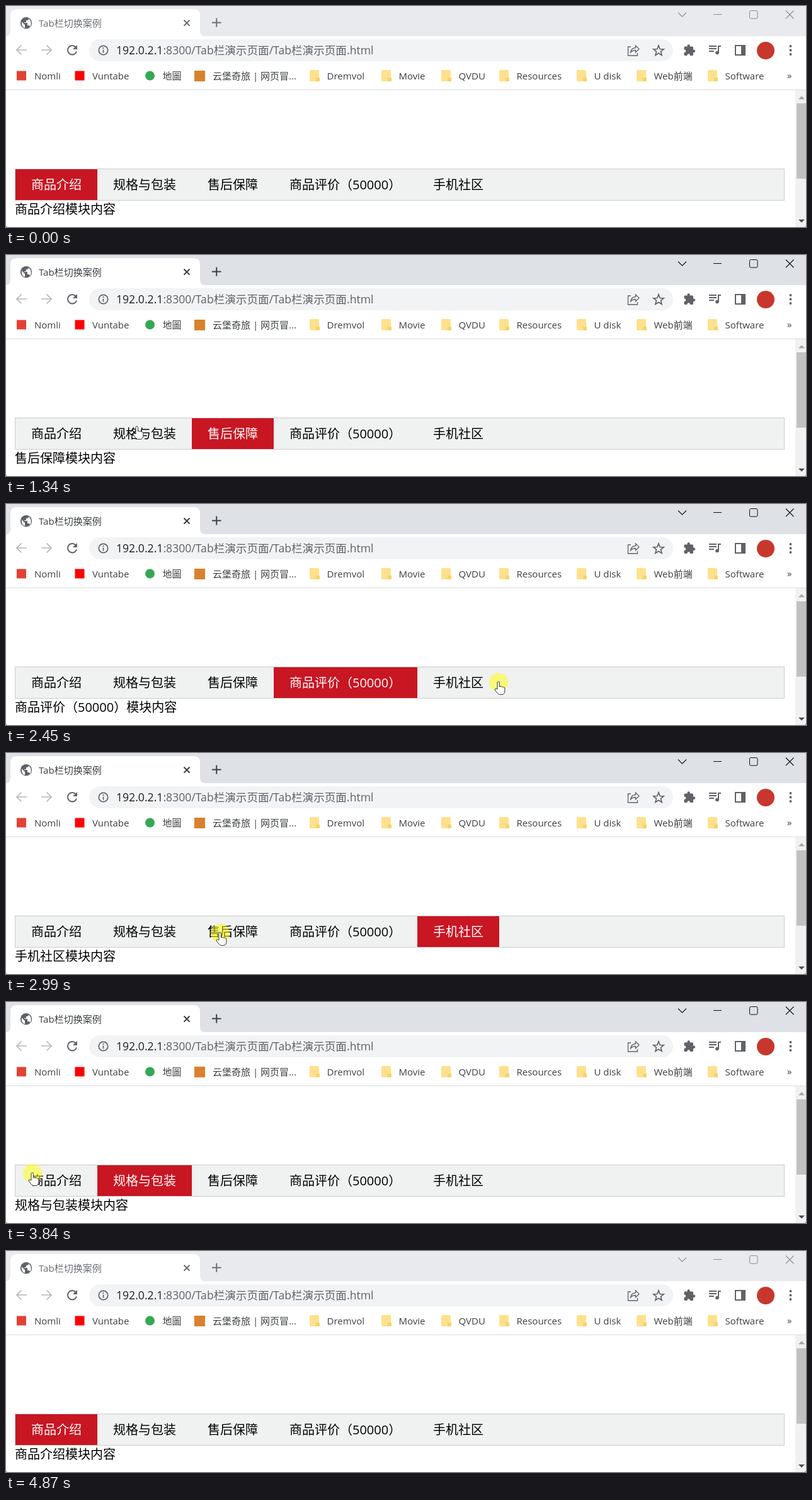
An HTML page for the animation above (4930 ms loop, 1270x352 px).

```html
<!DOCTYPE html>
<html lang="zh-CN">
<head>
<meta charset="utf-8">
<title>Tab栏切换案例</title>
<style>
html, body { margin: 0; width: 100%; height: 100%; overflow: hidden; background: #fff; }
svg { display: block; width: 1270px; height: 352px; }
text { font: 15px "Open Sans", "Noto Sans CJK SC", "Noto Sans CJK", sans-serif; fill: #3c4043; white-space: pre; }
.page text { font-size: 20px; fill: #000; }
.page .on { fill: #fff; }
.url { font-size: 17.6px; fill: #5f6368; }
.line { fill: none; stroke: #5f6368; stroke-width: 1.7; }
</style>
</head>
<body>
<svg id="stage" viewBox="0 0 1270 352"></svg>
<script>
const LOOP = 4930, TICK = 10, HOLD = 100;
const GREY = '#5f6368';
const stage = document.getElementById('stage');

// Tabs stand side by side, each as wide as its label plus 25px padding
let right = 15;
const tabs = ['商品介绍', '规格与包装', '售后保障', '商品评价（50000）', '手机社区'].map(name => {
  const digits = name.replace(/\D/g, '').length;
  const x = right, w = 50 + digits * 11.6 + (name.length - digits) * 20;
  right += w;
  return { name, x, w };
});

// Pointer trips: departure, arrival, press, then the points that shape the way
const trips = [
  [160, 670, 740, [1262, 345], [1230, 0], [730, 70], [355, 281]],
  [1170, 1340, 1470, [355, 281], [208, 273]],
  [1730, 2050, 2080, [208, 273], [530, 267]],
  [2250, 2450, 2450, [530, 267], [782, 283]],
  [2550, 2990, 2990, [782, 283], [340, 286]],
  [3110, 3350, 3380, [340, 286], [215, 261]],
  [3710, 3840, 3840, [215, 261], [42, 272]],
  [3940, 4540, LOOP, [42, 272], [600, 285], [1050, 265], [1285, 356]]
].map(([from, to, press, ...way]) => ({ from, to, press, way, end: way[way.length - 1] }));

const last = (list, test) => list.filter(test).pop();
const mix = (a, b, s) => a.map((v, i) => v + (b[i] - v) * s);
const bezier = (p, s) =>
  p.length === 1 ? p[0] : bezier(p.slice(1).map((b, i) => mix(p[i], b, s)), s);

function pointer(t) {
  const trip = last(trips, m => t >= m.from);
  if (!trip) return [1290, 360];
  const u = Math.min(1, (t - trip.from) / (trip.to - trip.from));
  return bezier(trip.way, trip.way.length > 2 ? u ** 0.6 : u);
}
const isPressed = t => trips.some(m => t >= m.press && t < m.press + HOLD);
const isFocused = t => t >= trips[0].press && t < LOOP - 60;
const isOverTab = t => {
  const [x, y] = pointer(t);
  return x > 15 && x < right && y > 260 && y < 309;
};
function selected(t) {
  const trip = last(trips, m => t >= m.press + HOLD);
  return trip ? tabs.findIndex(tab => trip.end[0] < tab.x + tab.w) : 0;
}

const rect = (x, y, w, h, fill, r = 0) =>
  `<rect x="${x}" y="${y}" width="${w}" height="${h}" rx="${r}" fill="${fill}"/>`;
const circle = (x, y, r, fill) => `<circle cx="${x}" cy="${y}" r="${r}" fill="${fill}"/>`;
const fill = (d, color) => `<path d="${d}" fill="${color}"/>`;
const line = (d, style = '') => `<path class="line" d="${d}" style="${style}"/>`;
const label = (s, x, y, attr = '') => `<text x="${x}" y="${y}" ${attr}>${s}</text>`;

const strip = (id, bg, ink, win) => `<g id="${id}">
  ${rect(0, 0, 1270, 48, bg)}
  ${fill('M0 48Q7 48 7 39V15Q7 5 17 5H298Q308 5 308 15V39Q308 48 316 48Z', '#fff')}
  ${circle(32, 27, 9.2, GREY)}
  ${fill('M25 25l5 5v5q-6-2-5-10zM29 27h5v4h3l1 2q3-4 1-9l-3-4q0 3-4 3v3h-3z', '#fff')}
  ${label('Tab栏切换案例', 52, 33, `style="fill:${ink}"`)}
  ${line('M282.5 22.5l9 9m0-9l-9 9M327 26.5h14.500m-7.250-7v14', `stroke:${ink};stroke-width:2`)}
  ${line('M1067 10.5l6.5 6.5 6.5-6.500M1123 13.500h13M1238 7.500l12.500 12.500m0-12.500l-12.500 12.500', `stroke:${win};stroke-width:1.1`)}
  <rect x="1180.5" y="7.5" width="12.500" height="12.500" rx="2" fill="none" stroke="${win}"/>
</g>`;

const star = Array.from({ length: 10 }, (_, i) => {
  const a = i * Math.PI / 5, r = i % 2 ? 3.7 : 8.6;
  return `${1036 + r * Math.sin(a)},${71.5 - r * Math.cos(a)}`;
}).join(' ');

const puzzle = rect(1076.5, 64.5, 14.5, 14.5, GREY, 1.5) +
  circle(1083.7, 63.5, 2.2, GREY) + circle(1092, 71.7, 2.2, GREY) +
  circle(1077, 71.7, 2.3, '#fff') + circle(1083.7, 78.500, 2.3, '#fff');

const playlist = line('M1116 64h12m-12 4h12m-12 4h8M1131 75V64h4', 'stroke-width:2') +
  circle(1129, 74.5, 2.8, GREY);

const toolbar = `
  ${line('M33 70H17m7.5-7.5L17 70l7.5 7.5', 'stroke:#b5b7ba')}
  ${line('M56 70h16m-7.5-7.5L72 70l-7.5 7.5', 'stroke:#b5b7ba')}
  ${line('M110.5 65.500a7.2 7.2 0 1 0 1.5 7', 'stroke-width:2')}${fill('M113 62v7h-7z', GREY)}
  ${rect(132, 53, 927, 35, '#f1f3f4', 17.5)}
  <circle class="line" cx="154.5" cy="70.5" r="7.2"/>
  ${line('M154.5 66v2m0 1.5v5')}
  ${label('<tspan fill="#202124">192.0.2.1</tspan>:8300/Tab栏演示页面/Tab栏演示页面.html', 175, 77, 'class="url"')}
  ${line('M992 65h-4.5v14h15v-4M991.5 74q1-7 8-7.500v-3.500l5.500 5.500-5.500 5.500v-3.500q-5 0-8 3.500z', 'stroke-width:1.3')}
  <polygon class="line" points="${star}"/>
  ${puzzle}${playlist}
  ${line('M1158 63h15v15h-15z', 'stroke-width:2')}${rect(1167, 62, 7, 17, GREY)}
  ${circle(1206, 71, 14, '#c8372d')}
  ${[-1, 0, 1].map(i => circle(1245.5, 70.5 + 6.5 * i, 1.9, GREY)).join('')}`;

const bookmark = (icon, name, x) => icon + label(name, x, 116.5);
const folder = (name, x) => bookmark(
  rect(x - 28, 102, 15, 18, '#ffe08c', 1.5) + rect(x - 18, 114, 6, 6, '#f7d268', 1), name, x - 0.5);

const bookmarks =
  bookmark(rect(17, 103.5, 15, 15, '#e34133'), 'Nomli', 45) +
  bookmark(rect(109.5, 103.5, 15, 15, '#f00'), 'Vuntabe', 137) +
  bookmark(circle(228.5, 111, 7.5, '#34a853'), '地圖', 248.5) +
  bookmark(rect(299, 103, 17, 17, '#d9822b'), '云堡奇旅 | 网页冒...', 328) +
  folder('Dremvol', 510) + folder('Movie', 624) + folder('QVDU', 719) + folder('Resources', 811) +
  folder('U disk', 934) + folder('Web前端', 1029) + folder('Software', 1142) +
  label('»', 1240, 116) + rect(0, 133, 1270, 1, '#d9dbdf');

const page = `<g class="page">
  <rect x="14.5" y="259.5" width="1221" height="50" fill="#f0f1f1" stroke="#ccc"/>
  ${tabs.map(({ name, x }) => label(name, x + 25, 292)).join('')}
  ${tabs.map(({ name, x, w }, i) => `<g id="tab${i}">
    ${rect(x, 260, w, 49, '#c81623')}
    ${label(name, x + 25, 292, 'class="on"')}${label(name + '模块内容', 14, 331)}
  </g>`).join('')}
</g>`;

const scrollbar = rect(1253, 134, 17, 218, '#f1f1f1') + rect(1255, 155, 15, 120, '#c1c1c1') +
  fill('M1258 148.5l5-5 5 5z', '#a3a3a3') + fill('M1258 340l5 5 5-5z', '#505050');

const corners = fill('M0 349q0 3 3 3H0zM1270 349q0 3-3 3h3z', '#888');

const cursor = `<g id="cursor" stroke="#333" fill="#fff" stroke-linejoin="round">
  <circle id="halo" r="15" cy="1" fill="#ff0" fill-opacity=".5" stroke="none"/>
  <path id="arrow" d="M.5.5V18.5L5.3 13.4H12.6Z"/>
  <path id="hand" d="M-2 12V1.5a1.7 1.7 0 0 1 3.4 0V8q1.500-2 3 .3 1.500-2 3 .7 1.500-1 2.500 1v4q0 6.500-5 6.500H1.500Q-1.500 20-6 12.800q0-3 4-.800z"/>
</g>`;

stage.innerHTML = strip('idle', '#e8eaed', '#6b6f74', '#8b8c8f') +
  strip('live', '#dee1e6', '#3c4043', '#111') +
  toolbar + bookmarks + page + scrollbar + corners + cursor;

// Samples a pose function over the loop
const play = (id, pose) => document.getElementById(id).animate(
  Array.from({ length: LOOP / TICK + 1 }, (_, i) =>
    ({ offset: i * TICK / LOOP, easing: 'steps(1)', ...pose(i * TICK) })),
  { duration: LOOP, iterations: Infinity });
const show = (id, test) => play(id, t => ({ opacity: test(t) ? 1 : 0 }));

tabs.forEach((_, i) => show('tab' + i, t => selected(t) === i));
show('idle', t => !isFocused(t));
show('live', isFocused);
show('halo', isPressed);
show('arrow', t => !isOverTab(t));
show('hand', isOverTab);
play('cursor', t => {
  const [x, y] = pointer(t);
  return { transform: `translate(${x}px, ${y}px)` };
});
</script>
</body>
</html>
```
